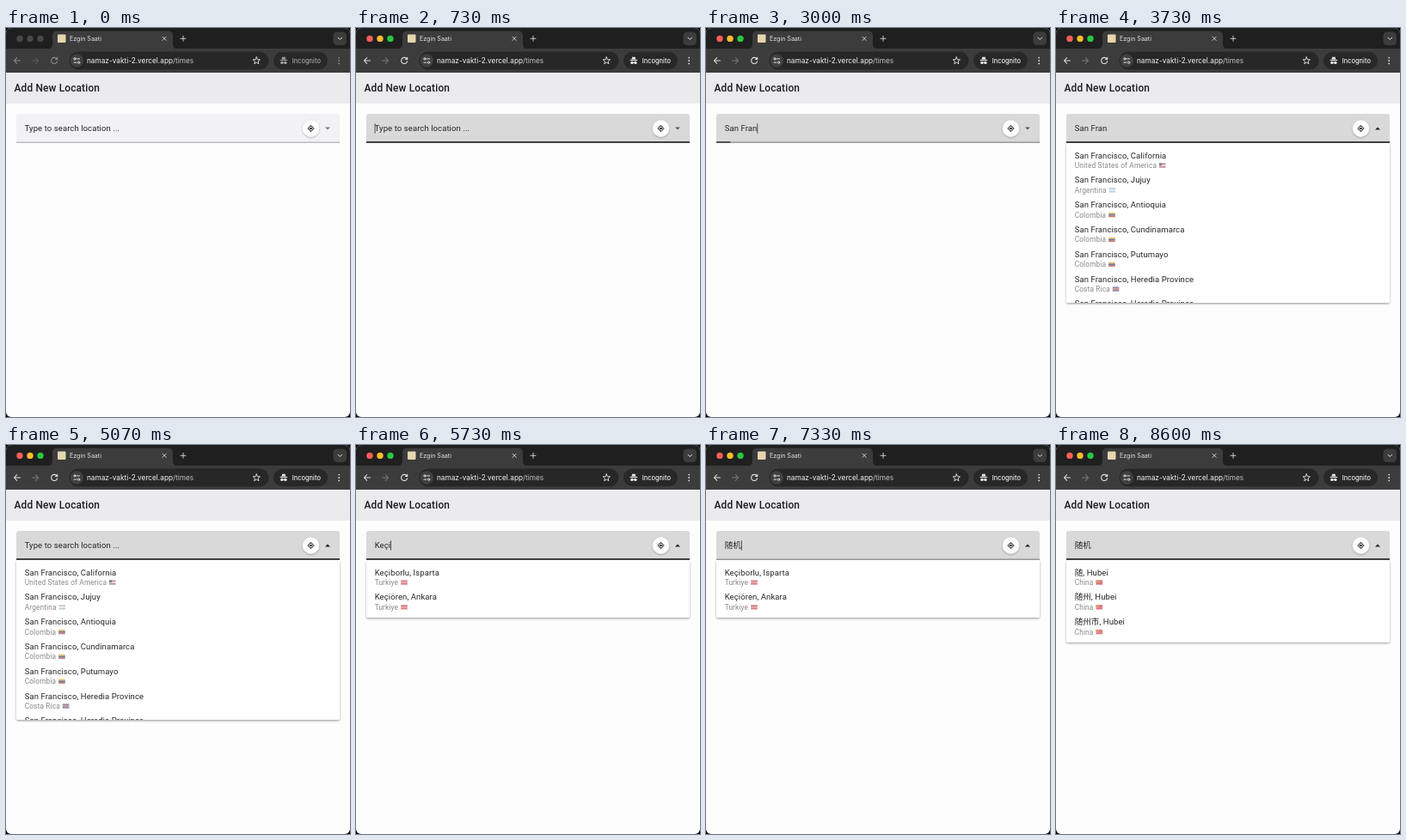
Recreate the animation shown at these times as an HTML page. Size 400 by 453 pixels, loop 8.87 s.

```html
<!DOCTYPE html>
<html lang="en">
<head>
<meta charset="utf-8">
<title>Add New Location</title>
<style>
html, body { margin: 0; width: 100%; height: 100%; overflow: hidden; background: #000; }
svg { display: block; width: 100vw; height: 100vh; }
text { white-space: pre; }
.ui { font-family: Inter, "Noto Sans", sans-serif; }
.page { font-family: Roboto, "Noto Sans CJK SC", "Noto Sans CJK", sans-serif; }
.body { font-size: 9.5px; letter-spacing: .09px; fill: #262628; }
.sub { font-size: 8.3px; letter-spacing: .148px; fill: #88888a; }
.line { fill: none; stroke-linecap: round; stroke-linejoin: round; }
</style>
</head>
<body>
<svg viewBox="0 0 400 453">
  <defs>
    <clipPath id="win"><rect width="400" height="453" rx="6"/></clipPath>
    <clipPath id="fieldClip"><rect x="12" y="100" width="376" height="34"/></clipPath>
    <clipPath id="menuClip"><rect id="menuClipRect" x="12" y="134" width="376" height="186" rx="2"/></clipPath>
    <filter id="shadow" x="-10%" y="-20%" width="120%" height="150%">
      <feDropShadow dx="0" dy="1.2" stdDeviation="1.3" flood-opacity=".38"/>
    </filter>
    <filter id="knobShadow" x="-40%" y="-40%" width="180%" height="190%">
      <feDropShadow dx="0" dy=".8" stdDeviation=".8" flood-opacity=".32"/>
    </filter>
  </defs>
  <g clip-path="url(#win)">
    <rect width="400" height="453" fill="#fdfdfe"/>

    <g class="ui">
      <rect width="400" height="26" fill="#1f1f20"/>
      <path d="M48 24.5Q54 24.5 54 18.5V9Q54 3.500 59.500 3.500H188.500Q194 3.500 194 9V18.500Q194 24.500 200 24.500Z" fill="#3c3c3d"/>
      <rect y="24" width="400" height="28" fill="#3c3c3d"/>
      <g id="lights"></g>
      <rect x="60" y="7.500" width="9.500" height="9.500" rx="1" fill="#e6d6ad"/>
      <text x="74" y="14.800" font-size="7.100" fill="#e6e6e6">Ezgin Saati</text>
      <path class="line" d="M182 10.200l4.200 4.200m0-4.200l-4.200 4.200" stroke="#dcdcdc" stroke-width=".9"/>
      <path class="line" d="M203 12.300h6m-3-3v6" stroke="#d8d8d8" stroke-width=".9"/>
      <rect x="380.500" y="4.500" width="15.500" height="15.500" rx="4.500" fill="#3c3c3d"/>
      <path class="line" d="M386 11.200l2.300 2.300l2.300-2.300" stroke="#e2e2e2"/>

      <g id="nav" class="line" stroke-width="1.050">
        <path d="M16.500 38H9.500m3.200-3.300L9.400 38l3.300 3.300"/>
        <path d="M30.500 38h7m-3.200-3.300l3.300 3.300l-3.300 3.300" opacity=".38"/>
        <path d="M59.200 36a3.600 3.600 0 1 0 .5 2.700M59.700 34.200v2.200h-2.200"/>
      </g>
      <rect x="73.500" y="27.500" width="232" height="21" rx="10.500" fill="#272728"/>
      <circle cx="82.300" cy="38" r="7.700" fill="#404041"/>
      <g class="line" stroke="#e4e4e4" stroke-width=".95">
        <circle cx="80" cy="35.900" r="1.150"/><path d="M82.700 35.900h2.900"/>
        <circle cx="84.600" cy="40.200" r="1.150"/><path d="M79 40.200h2.900"/>
      </g>
      <text x="94" y="41" font-size="8.250" fill="#f4f4f4">namaz-vakti-2.vercel.app<tspan fill="#c2c2c2">/times</tspan></text>
      <path id="star" class="line" stroke="#dedede" stroke-width=".95"/>
      <rect x="311" y="27.800" width="63" height="20.400" rx="10.200" fill="#282829"/>
      <g id="incognito">
        <path d="M320.300 36.500l.9-2.500q.2-.5.7-.4l1 .3l1-.3q.5-.1.7.4l.9 2.500z"/>
        <rect x="318.500" y="36.900" width="8.800" height="1" rx=".4"/>
        <circle cx="320.900" cy="40.400" r="1.700"/><circle cx="324.900" cy="40.400" r="1.700"/>
        <rect x="322" y="39.700" width="2" height=".8"/>
        <text x="332.700" y="40.800" font-size="7.450" font-weight="500">Incognito</text>
      </g>
      <g id="dots"><circle cx="387.200" cy="34.600" r=".9"/><circle cx="387.200" cy="38" r=".9"/><circle cx="387.200" cy="41.400" r=".9"/></g>
    </g>

    <g class="page">
      <rect y="52" width="400" height="36" fill="#ebebed"/>
      <text x="9.500" y="74.200" font-size="11.900" font-weight="500" letter-spacing=".15" fill="#1c1c1e">Add New Location</text>

      <g id="menu">
        <rect id="menuBox" x="12" y="134" width="376" height="186" rx="2" fill="#fff" filter="url(#shadow)"/>
        <g id="items" clip-path="url(#menuClip)"></g>
      </g>

      <path id="field" d="M12 133.500V103Q12 100 15 100H385Q388 100 388 103V133.500Z"/>
      <rect id="rule" x="12" y="132.700" width="376" height=".9"/>
      <rect id="active" y="132.200" height="1.500" fill="#202022"/>
      <g clip-path="url(#fieldClip)"><rect id="bar" y="132.200" height="1.500" fill="#38383a"/></g>
      <text id="hint" class="body" x="21.700" y="120.400">Type to search location ...</text>
      <text id="input" class="body" x="21.700" y="120.400"></text>
      <rect id="caret" y="111.300" width=".8" height="11.400" fill="#2c2c2e"/>
      <circle cx="354.500" cy="117" r="9.700" fill="#fff" filter="url(#knobShadow)"/>
      <circle cx="354.500" cy="117" r="2.700" fill="none" stroke="#1c1c1e" stroke-width=".9"/>
      <circle cx="354.500" cy="117" r="1.350" fill="#1c1c1e"/>
      <path d="M354.500 113v1.300m0 5.400v1.300M350.500 117h1.300m5.400 0h1.300" stroke="#1c1c1e" stroke-width=".9"/>
      <path id="arrow" d="M-3-1.500H3L0 1.500Z"/>
    </g>
  </g>
</svg>
<script>
const LOOP = 8870;
const $ = id => document.getElementById(id);
const set = (el, attrs) => { for (const k in attrs) el.setAttribute(k, attrs[k]); };
const add = (parent, tag, attrs, text = '') => {
  const el = document.createElementNS('http://www.w3.org/2000/svg', tag);
  set(el, attrs);
  el.textContent = text;
  return parent.appendChild(el);
};
const ramp = (t, a, b) => Math.min(1, Math.max(0, (t - a) / (b - a)));
const ease = x => x * x * (3 - 2 * x);
const latest = (list, t) => list.filter(e => e[0] <= t).pop()[1];

const typed = [
  [0, ''], [1870, 'S'], [1930, 'Sa'], [2000, 'San'], [2130, 'San '],
  [2330, 'San F'], [2400, 'San Fr'], [2470, 'San Fra'], [2930, 'San Fran'],
  ...Array.from({ length: 8 }, (_, i) => [3870 + i * 67, 'San Fran'.slice(0, 7 - i)]),
  [5330, 'K'], [5400, 'Ke'], [5470, 'Keç'], [5530, 'Keçi'],
  [6270, 'Keç'], [6330, 'Ke'], [6400, 'K'], [6800, ''], [7330, '随机']
];
const loads = [[1870, 2130], [2930, 3400], [4800, 5030], [5330, 5600], [6800, 7130], [7330, 8060]];
// The caret flips at each of these times.
const blinks = [600, 930, 1200, 1400, 1670, 2730, 2930, 3730, 3870, 4800, 5330,
  6070, 6270, 7130, 7330, 7600, 7800, 8070, 8330, 8600];

const flags = {
  'United States of America': ['#c98f92', '#e2dcdf', '#c98f92', '#77809f'],
  'Argentina': ['#b9cfdd', '#f1f1ee', '#b9cfdd'],
  'Colombia': ['#e0c46c', '#6d7690', '#c07a74'],
  'Costa Rica': ['#8a91ab', '#d98c8e', '#8a91ab'],
  'Turkiye': ['#dc8286', '#e2a1a3', '#dc8286'],
  'China': ['#d9777a', '#d9777a', '#d9777a', '#dda074']
};
const sf = (region, country) => ['San Francisco, ' + region, country];
const results = [
  [0, []],
  [3330, [sf('California', 'United States of America'), sf('Jujuy', 'Argentina'),
    sf('Antioquia', 'Colombia'), sf('Cundinamarca', 'Colombia'), sf('Putumayo', 'Colombia'),
    sf('Heredia Province', 'Costa Rica'), sf('Heredia Province', 'Costa Rica')]],
  [5730, [['Keçiborlu, Isparta', 'Turkiye'], ['Keçiören, Ankara', 'Turkiye']]],
  [8070, [['随, Hubei', 'China'], ['随州, Hubei', 'China'], ['随州市, Hubei', 'China']]]
];

const lights = ['#fe5f57', '#febc2e', '#28c840'].map((color, i) =>
  [add($('lights'), 'circle', { cx: 16 + 12 * i, cy: 12.4, r: 3.7 }), color]);

set($('star'), { d: 'M' + Array.from({ length: 10 }, (_, i) => {
  const r = i % 2 ? 1.9 : 4.4, a = i * Math.PI / 5;
  return (291.3 + r * Math.sin(a)).toFixed(2) + ' ' + (38.2 - r * Math.cos(a)).toFixed(2);
}).join('L') + 'Z' });

function drawFlag(x, y, [top, mid, low, canton]) {
  [top, mid, low].forEach((fill, i) =>
    add($('items'), 'rect', { x, y: y + i * 1.75, width: 7.6, height: 1.8, fill }));
  if (canton) add($('items'), 'rect', { x, y, width: 3.2, height: 2.7, fill: canton });
}

let shown = null;
function fillMenu(list) {
  if (list === shown) return;
  shown = list;
  $('items').textContent = '';
  list.forEach(([title, country], i) => {
    const y = 151.5 + 28.8 * i;
    add($('items'), 'text', { class: 'body', x: 21.7, y }, title);
    const sub = add($('items'), 'text', { class: 'sub', x: 21.7, y: y + 11.5 }, country);
    drawFlag(21.7 + sub.getComputedTextLength() + 3, y + 5.9, flags[country]);
  });
  const height = Math.min(186, 9.4 + 28.8 * list.length);
  set($('menuBox'), { height });
  set($('menuClipRect'), { height });
}

function drawChrome(focused) {
  for (const [dot, color] of lights) set(dot, { fill: focused ? color : '#48484a' });
  set($('nav'), { stroke: focused ? '#dedede' : '#8c8c8d' });
  set($('incognito'), { fill: focused ? '#ececec' : '#a2a2a3' });
  set($('dots'), { fill: focused ? '#dedede' : '#8c8c8d' });
}

function drawField(t) {
  const focus = ease(ramp(t, 500, 730));
  const grey = (a, b) => Math.round(a + (b - a) * focus);
  set($('field'), { fill: `rgb(${grey(242, 217)},${grey(242, 217)},${grey(244, 218)})` });
  set($('rule'), { fill: focus > .5 ? '#656567' : '#9a9a9c' });

  const load = loads.find(([a, b]) => t >= a && t < b);
  const width = load ? 0 : 376 * focus;
  set($('active'), { x: 200 - width / 2, width });
  const p = load ? ramp(t, load[0], load[0] + 1100) : 0;
  const left = 12 + 376 * Math.max(-.9, -.9 + 1.9 * ease(ramp(p, .15, 1)));
  const right = 12 + 376 * 1.35 * ease(ramp(p, 0, .6));
  set($('bar'), { x: left, width: p ? Math.max(0, right - left) : 0 });

  const text = latest(typed, t);
  $('input').textContent = text;
  set($('hint'), { fill: focus > .5 ? '#98989a' : '#a6a6a8', opacity: text ? 0 : 1 });
  const end = text ? $('input').getComputedTextLength() : 0;
  const on = blinks.filter(b => b <= t).length % 2;
  set($('caret'), { x: 21.7 + end, opacity: on });
}

function drawMenu(t) {
  const open = ease(ramp(t, 3300, 3470));
  fillMenu(latest(results, t));
  set($('menu'), {
    opacity: t < 3330 ? 0 : open,
    transform: `translate(0 ${134 * .2 * (1 - open)}) scale(1 ${.8 + .2 * open})`
  });
  set($('arrow'), {
    transform: `translate(374 117) rotate(${180 * open})`,
    fill: open > .5 ? '#202022' : t < 470 ? '#7c7c7e' : '#5c5c5e'
  });
}

function draw(now) {
  const t = now % LOOP;
  drawChrome(t >= 470);
  drawField(t);
  drawMenu(t);
  requestAnimationFrame(draw);
}
draw(0);
</script>
</body>
</html>
```
